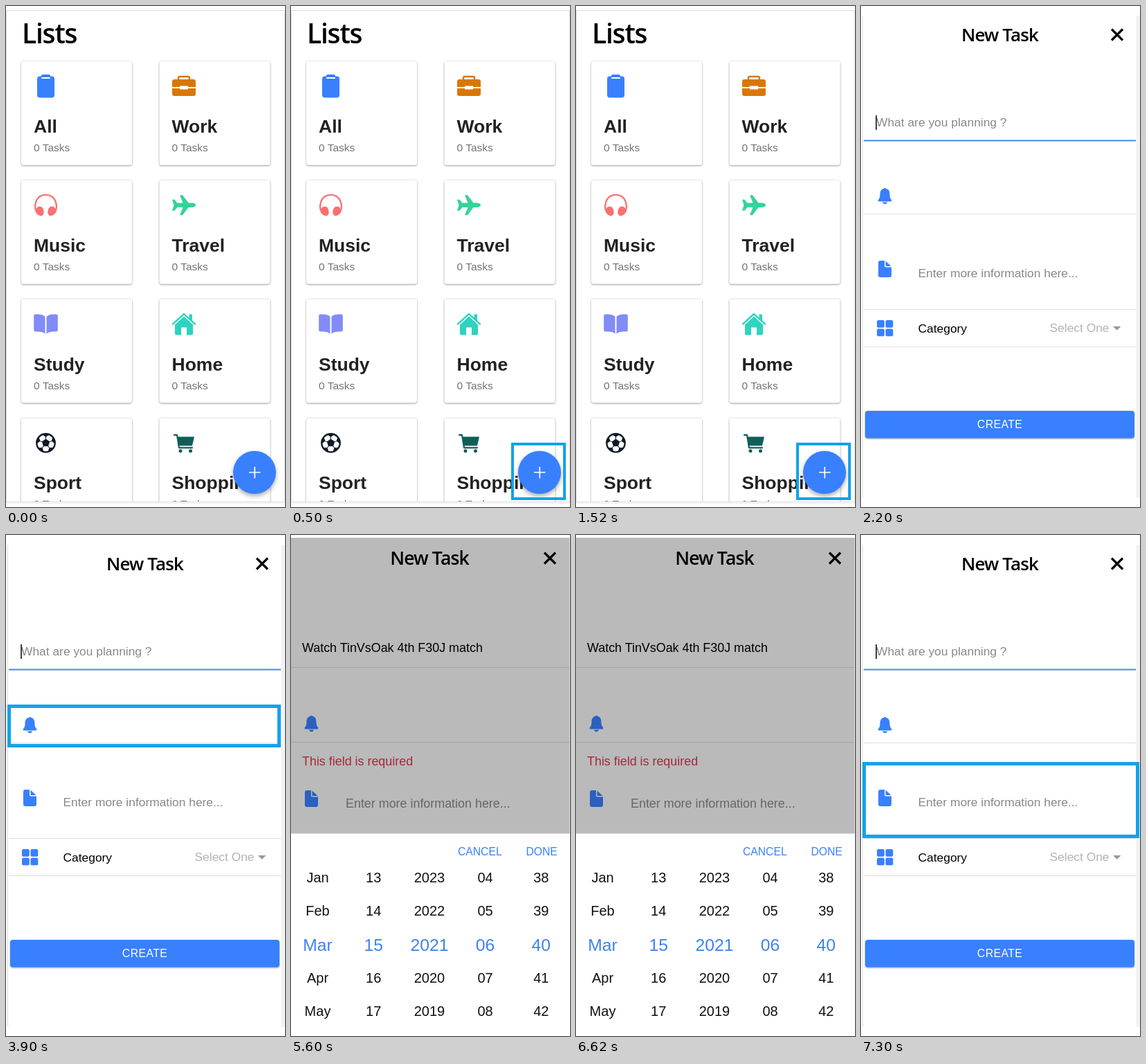
Write an HTML page that moves like this. It is 403x724 px and loops after 8000 ms.

```html
<!DOCTYPE html>
<html lang="en">
<head>
<meta charset="utf-8">
<title>Task lists</title>
<style>
  html, body { margin: 0; width: 100%; height: 100%; overflow: hidden; background: #fff; }
  svg { display: block; width: 403px; height: 724px; font: 17.4px "Liberation Sans", Arial, sans-serif; }
  .title { font: 600 26px "Open Sans", "Noto Sans", sans-serif; letter-spacing: -.9px; }
  .card { fill: #fff; filter: drop-shadow(0 1.5px 1px #0005) drop-shadow(0 0 1.5px #0002); }
  .name { font-size: 26.5px; font-weight: bold; fill: #222; }
  .count { font-size: 15.5px; fill: #737373; }
  .rule { stroke: #dedede; fill: none; }
  .hint { fill: #888; }
  .mark { fill: none; stroke: #10a3ec; stroke-width: 5; }
  .mid { text-anchor: middle; }
  .blue { fill: #3880ff; }
  .line { fill: none; stroke: currentColor; }
</style>
</head>
<body>
<svg viewBox="0 0 403 724">
  <defs>
    <clipPath id="page"><path d="M1 7H402V716H1Z"/></clipPath>
    <path id="bell" d="M-2 -10.5Q0 -12.5 2 -10.5C6 -9.5 7 -6 7 -2C7 2 8 4 9.5 5.5Q10.500 8 8.500 8H-8.500Q-10.500 8 -9.500 5.500C-8 4 -7 2 -7 -2C-7 -6 -6 -9.500 -2 -10.500ZM-3.800 9H3.800Q2.500 11.800 0 11.800T-3.800 9Z"/>
    <path id="file" d="M-6.500 -12H-.5V-4.500Q-.5 -2.500 1.500 -2.500H9.500V9Q9.500 12 6.500 12H-6.500Q-9.500 12 -9.500 9V-9Q-9.500 -12 -6.500 -12ZM1 -11.500L9 -4H2Q1 -4 1 -5Z"/>
    <path id="close" d="M-8 -8L8 8M8 -8L-8 8" stroke="#000" stroke-width="3.200"/>
  </defs>

  <g id="lists">
    <path class="rule" d="M.5 716.500V6.500H402.500V716.500Z"/>
    <rect y="717" width="403" height="3" fill="#f5f5f5"/>
    <text class="title" x="23" y="54" style="font-size:39px;letter-spacing:-1.2px">Lists</text>
    <g id="cards" clip-path="url(#page)"></g>
    <circle class="blue" cx="359" cy="674" r="31" style="filter:drop-shadow(0 3px 3px #0005)"/>
    <path d="M351 674H367.500M359.300 666V682.500" stroke="#fff" stroke-width="1.700"/>
    <rect id="addMark" class="mark" style="stroke-width:4" x="320" y="633" width="75" height="79"/>
  </g>

  <g id="form">
    <rect x="397.500" y="14" width="5.500" height="697" fill="#f2f2f2"/>
    <path class="rule" d="M2.500 14V711M4 300.500H397M4 438.500H397M4 492.500H397"/>
    <text class="title mid" x="200.500" y="51">New Task</text>
    <use href="#close" x="370" y="41.500"/>
    <text class="hint" x="22" y="174">What are you planning ?</text>
    <path d="M22 158V179" stroke="#000" stroke-width="1.500"/>
    <path d="M4 194.500H397" stroke="#4a88e0" stroke-width="2"/>
    <g class="blue">
      <use href="#bell" x="34.500" y="274.500"/>
      <use href="#file" x="34.500" y="380"/>
      <rect x="23" y="454" width="10.800" height="10.800" rx="2"/>
      <rect x="35.500" y="454" width="10.800" height="10.800" rx="2"/>
      <rect x="23" y="466.500" width="10.800" height="10.800" rx="2"/>
      <rect x="35.500" y="466.500" width="10.800" height="10.800" rx="2"/>
      <rect x="6" y="585" width="389" height="39.500" rx="4" style="filter:drop-shadow(0 1.5px 1px #0006)"/>
    </g>
    <text class="hint" x="82.500" y="392">Enter more information here...</text>
    <text x="82.500" y="472">Category</text>
    <text x="272.500" y="471" fill="#b3b3b3">Select One</text>
    <path d="M364 463H375.500L369.800 468.800Z" fill="#999"/>
    <text class="mid" x="200.500" y="610" fill="#fff" style="font-size:15.8px;letter-spacing:.4px">CREATE</text>
    <rect id="bellMark" class="mark" x="4.500" y="247.500" width="390" height="57"/>
    <rect id="noteMark" class="mark" x="4.500" y="330.500" width="395" height="105"/>
  </g>

  <g id="picker" style="font-size:17.9px">
    <rect y="4" width="402.500" height="427.500" fill="#bababa"/>
    <path d="M0 191.500H402M0 299.500H402" stroke="#a4a4a4"/>
    <text class="title mid" x="200" y="43" style="font-size:26.600px">New Task</text>
    <use href="#close" x="374" y="33.500"/>
    <text x="16" y="169">Watch TinVsOak 4th F30J match</text>
    <g fill="#2a60bf">
      <use href="#bell" x="29.500" y="272.500"/>
      <use href="#file" x="29.500" y="381"/>
    </g>
    <text x="16" y="333" fill="#a9273b">This field is required</text>
    <text x="79" y="394" fill="#666">Enter more information here...</text>
    <g class="blue" style="font-size:15.7px">
      <text x="241" y="463">CANCEL</text>
      <text x="339.500" y="463">DONE</text>
    </g>
    <g id="wheel" class="mid"></g>
  </g>
</svg>
<script>
const $ = id => document.getElementById(id);

// Icons are drawn around their own centre.
const lists = [
  ['All', '#3880ff', `<rect x="-12.500" y="-14.500" width="25" height="31" rx="4"/>
    <rect x="-6.500" y="-17" width="13" height="6" rx="2"/><path d="M-5.500 -12H5.500" stroke="#fff" stroke-width="2" stroke-linecap="round"/>`],
  ['Work', '#d97706', `<path d="M-14 -10H14Q17 -10 17 -7V1H6V-.5H-6V1H-17V-7Q-17 -10 -14 -10ZM-17 3H-6V4.500H6V3H17V11Q17 14 14 14H-14Q-17 14 -17 11Z"/>
    <path class="line" d="M-8 -10V-12Q-8 -14 -6 -14H6Q8 -14 8 -12V-10" stroke-width="2.500"/>`],
  ['Music', '#f87171', `<path class="line" d="M-13 11C-18 2 -15 -15 0 -15S18 2 13 11" stroke-width="2.300"/>
    <path id="cup" d="M-9 2C-5 1 -2 7 -3 12Q-5 17 -9 15C-13 14 -15 10 -14 6Q-13 2 -9 2Z"/><use href="#cup" transform="scale(-1 1)"/>`],
  ['Travel', '#34d399', `<path d="M-17 -8H-13.500L-9.500 -3L-1.500 -3.200L-6 -14.500H-2L6.500 -3.200H12Q17 -2.500 17 0T12 3.200H6.500L-2 14.500H-6L-1.500 3.200L-9.500 3L-13.500 8H-17L-14.500 0Z"/>`],
  ['Study', '#818cf8', `<path id="leaf" d="M-1 -10.500V14.500C-4 11 -9 11 -15 11Q-17.300 11 -17.300 9V-12Q-17.300 -14 -15 -14C-9 -14.300 -4 -14 -1 -10.500Z"/><use href="#leaf" transform="scale(-1 1)"/>`],
  ['Home', '#2dd4bf', `<path d="M0 -11L13 1V14Q13 16 11 16H4V5H-4V16H-11Q-13 16 -13 14V1Z"/>
    <path class="line" d="M-16 0L0 -14.500L16 0" stroke-width="2.500" stroke-linecap="round" stroke-linejoin="round"/><path d="M7.500 -14H12V-4L7.500 -8Z"/>`],
  ['Sport', '#111827', `<circle class="line" r="13.200" stroke-width="2.400"/><path d="M0 -6L5.700 -1.900L3.500 4.900H-3.500L-5.700 -1.900Z"/>` +
    [0, 72, 144, 216, 288].map(a => `<path transform="rotate(${a})" d="M-5.500 -12.500H5.500L0 -8.500ZM-.5 -9H.5V-5H-.5Z"/>`).join('')],
  ['Shopping', '#115e59', `<path class="line" d="M-14 -11.500H-10L-7 7H12" stroke-width="2.200" stroke-linecap="round" stroke-linejoin="round"/>
    <path d="M-9.500 -9H15L12 4H-7.500Z"/><circle cx="-5" cy="11.500" r="2.500"/><circle cx="9.500" cy="11.500" r="2.500"/>`],
];

$('cards').innerHTML = lists.map(([name, color, icon], i) => {
  const x = i % 2 ? 221.5 : 22, y = 80 + 171.8 * (i >> 1);
  return `<g transform="translate(${x} ${y})">
    <rect class="card" width="160" height="150" rx="3.500"/>
    <g transform="translate(35.500 36)" fill="${color}" color="${color}">${icon}</g>
    <text class="name" x="18" y="103">${name}</text>
    <text class="count" x="18" y="130">0 Tasks</text></g>`;
}).join('');

const rows = ['Jan 13 2023 04 38', 'Feb 14 2022 05 39', 'Mar 15 2021 06 40', 'Apr 16 2020 07 41', 'May 17 2019 08 42'];
$('wheel').innerHTML = rows.map((row, i) => row.split(' ').map((cell, j) => {
  const on = i === 2;
  return `<text x="${38.5 + 80.7 * j}" y="${502 + 48.3 * i + (on ? 2 : 0)}"
    style="font-size:${on ? 24.7 : 20}px" fill="${on ? '#3f82ee' : '#111'}">${cell}</text>`;
}).join('')).join('');

const show = (id, on) => $(id).style.display = on ? '' : 'none';

function draw(now) {
  const t = now % 8000;
  const picking = t >= 5600 && t < 7300;
  show('lists', t < 2200);
  show('addMark', t >= 500);
  show('form', t >= 2200 && !picking);
  show('bellMark', t >= 3900 && t < 5600);
  show('noteMark', t >= 7300);
  show('picker', picking);
}

const start = performance.now();
function tick() {
  draw(performance.now() - start);
  requestAnimationFrame(tick);
}
tick();
</script>
</body>
</html>
```
